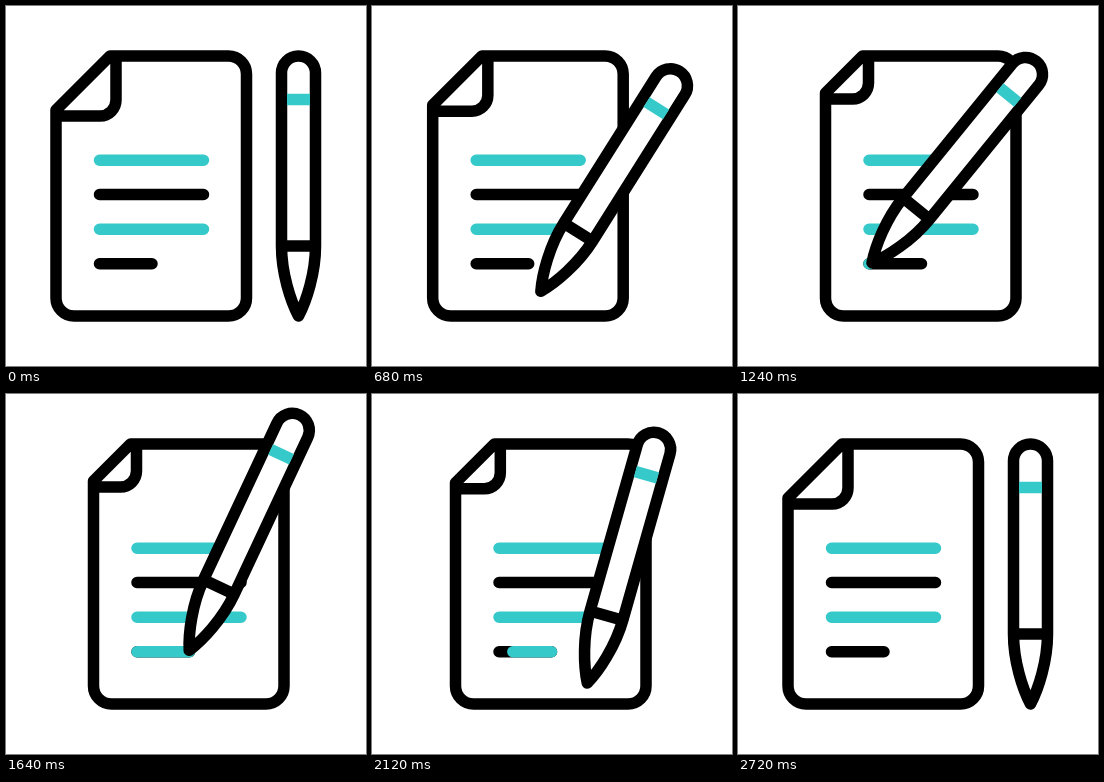
An HTML page for the animation above (3 s loop, 360 by 360 pixels).

```html
<!DOCTYPE html>
<html lang="en">
<head>
<meta charset="utf-8">
<title>Writing on a page</title>
<style>
  html, body { margin: 0; width: 100%; height: 100%; overflow: hidden; background: #fff; }
  svg { display: block; width: 100%; height: 100%; }
  .ink { fill: none; stroke: #000; stroke-width: 11.5; stroke-linecap: round; stroke-linejoin: round; }
  .teal { stroke: #36c9c9; }
</style>
</head>
<body>
<svg viewBox="0 0 360 360" class="ink">
  <g id="page">
    <path id="sheet"/>
    <path d="M93.5 154.2H197.5M93.5 223.2H197.5" class="teal"/>
    <path d="M93.5 188.5H197.5M93.5 257.7H146"/>
    <path id="writing" class="teal"/>
  </g>
  <g id="pen">
    <path d="M-17 173V0A17 17 0 0 1 17 0V173C17 200 8 228 0 243C-8 228 -17 200 -17 173ZH17" fill="#fff"/>
    <path d="M-11.5 26.5H11.5" class="teal" stroke-linecap="butt"/>
  </g>
</svg>
<script>
const LOOP = 3000;
const [page, sheet, writing, pen] =
  ['page', 'sheet', 'writing', 'pen'].map(id => document.getElementById(id));

const progress = (t, start, end) => Math.min(1, Math.max(0, (t - start) / (end - start)));

function ease(t, start, end) {
  const u = progress(t, start, end);
  return u * u * (3 - 2 * u);
}

// Rises from 0 to 1 and falls back, to bow the pen's path
const bump = (t, start, end) => Math.sin(Math.PI * progress(t, start, end)) ** 3;

function drawPage(t) {
  const slide = ease(t, 540, 940) - ease(t, 2040, 2440);
  const fold = 60 - 17 * slide, cut = 44 + fold;
  page.setAttribute('transform', `translate(${37.5 * slide})`);
  sheet.setAttribute('d',
    `M50 ${cut}L${cut} 50H222.5a18 18 0 0 1 18 18V292a18 18 0 0 1-18 18H68a18 18 0 0 1-18-18Z` +
    `M${50 + fold} 50v${fold - 16}a16 16 0 0 1-16 16H50`);
}

function drawWriting(t, drawn) {
  const erased = ease(t, 2010, 2340);
  writing.setAttribute('d', drawn > erased
    ? `M${93.5 + 52.5 * erased} 257.7H${93.5 + 52.5 * drawn}` : '');
}

function drawPen(t, write) {
  const reach = ease(t, 213, 853), back = ease(t, 1833, 2533);
  const returnBow = bump(t, 1833, 2533);
  const x = 292.5 - 5 * reach - 1.2 * write + 6.2 * back + 39 * bump(t, 205, 815) - 7.8 * returnBow;
  const y = 67 + 1.5 * reach - 32.2 * write + 30.7 * back + 11.5 * bump(t, 360, 1000) + 8.6 * returnBow;
  const tilt = 39.2 * reach - 14.1 * write - 25.1 * back;
  pen.setAttribute('transform', `translate(${x} ${y}) rotate(${tilt})`);
}

function tick() {
  const t = performance.now() % LOOP;
  const write = ease(t, 1230, 1630);
  drawPage(t);
  drawWriting(t, write);
  drawPen(t, write);
  requestAnimationFrame(tick);
}
tick();
</script>
</body>
</html>
```
